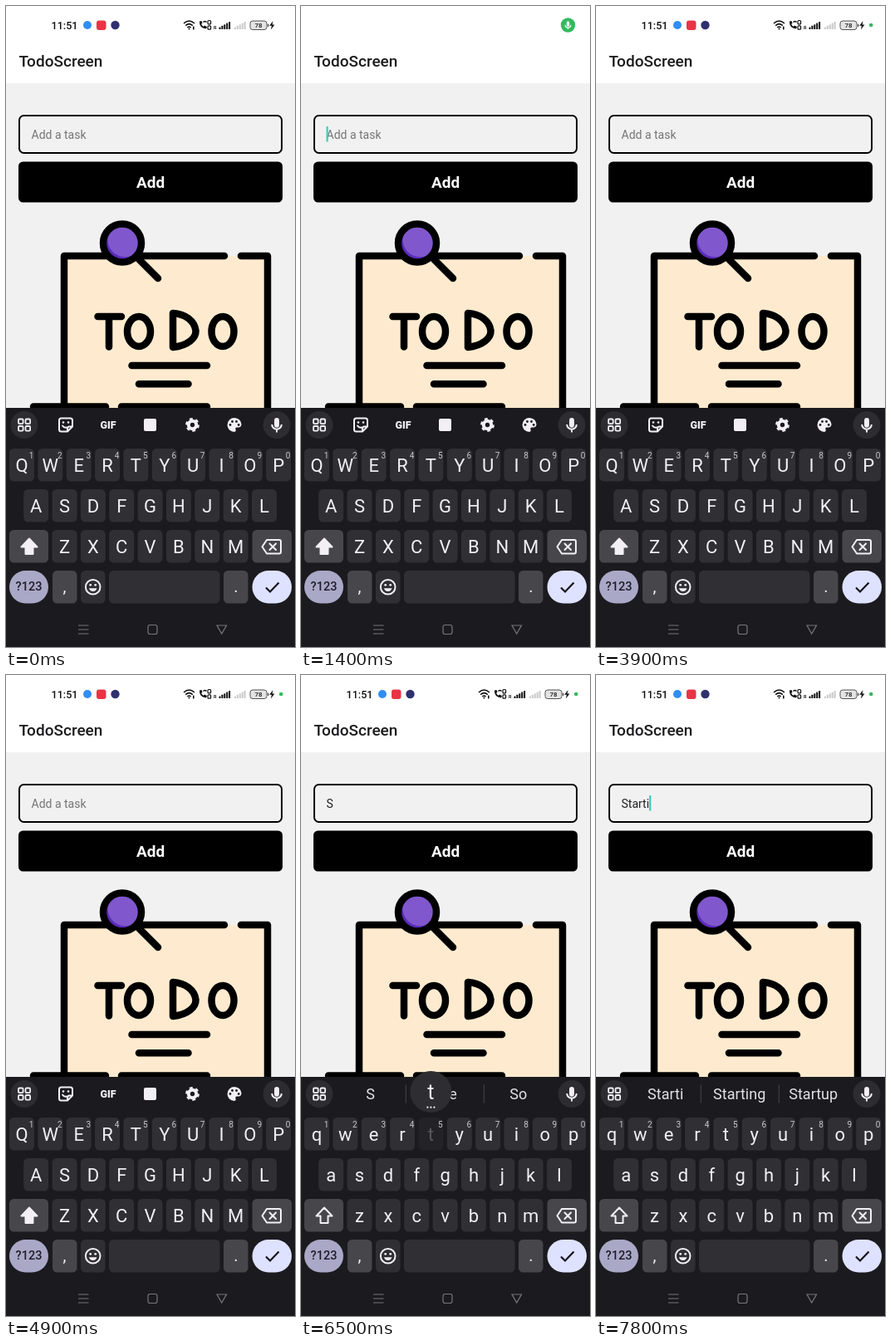
These frames come from a looping animation (348x772 px, 8000 ms). An HTML page:

```html
<!DOCTYPE html>
<html lang="en">
<head>
<meta charset="utf-8">
<title>Todo screen</title>
<style>
  html, body { margin: 0; width: 100%; height: 100%; overflow: hidden; background: #f1f1f1; }
  svg { display: block; width: 348px; height: 772px; }
  text { font-family: Roboto, sans-serif; white-space: pre; }
  .mid { text-anchor: middle; }
  .ink { fill: none; stroke: #000; stroke-width: 8.5; stroke-linecap: round; stroke-linejoin: round; }
  .line { fill: none; stroke: #f2f0f5; stroke-width: 2; stroke-linecap: round; stroke-linejoin: round; }
</style>
</head>
<body>
<svg id="stage" viewBox="0 0 348 772"></svg>
<script>
const LOOP = 8000, STEP = 100;
const DARK = '#1b1b1f', KEY = '#303034', SIDE = '#47474b', LIGHT = '#f2f0f5';

const rect = (x, y, w, h, r, fill, more = '') =>
  `<rect x="${x}" y="${y}" width="${w}" height="${h}" rx="${r}" fill="${fill}" ${more}/>`;
const circle = (x, y, r, fill, more = '') =>
  `<circle cx="${x}" cy="${y}" r="${r}" fill="${fill}" ${more}/>`;
const path = (d, more) => `<path d="${d}" ${more}/>`;
const text = (x, y, size, fill, str, more = '') =>
  `<text x="${x}" y="${y}" font-size="${size}" fill="${fill}" ${more}>${str}</text>`;
const label = (x, y, size, fill, str, more = '') =>
  text(x, y, size, fill, str, 'class="mid" ' + more);
const group = (id, body, more = '') => `<g id="${id}" ${more}>${body}</g>`;
const at = (x, y, body, s = 1) => `<g transform="translate(${x} ${y}) scale(${s})">${body}</g>`;

const mic = color => rect(-2.8, -8.5, 5.6, 11, 2.8, color) +
  path('M-5.5 -1a5.5 5.5 0 0 0 11 0M0 4.5v3.5', `fill="none" stroke="${color}" stroke-width="1.9"`);

function bars(x, color) {
  let s = '';
  for (let i = 0; i < 5; i++) s += rect(x + i * 2.9, 25.5 - i * 1.65, 2, 2.5 + i * 1.65, .5, color);
  return s;
}

function statusBar() {
  const arc = 'fill="none" stroke="#111" stroke-width="1.5"';
  const left = text(54.5, 27.5, 12.6, '#111', '11:51', 'font-weight="500"') +
    circle(98, 23, 5, '#2f8df4') + rect(109, 17.5, 11.5, 11.5, 3, '#e93445') + circle(131.5, 23, 5.2, '#30306f');
  const wifi = path('M214 21q6.5 -6 13 0M216.2 23.6q4.3 -4 8.6 0M218.3 26q2.2 -2 4.4 0', arc) +
    circle(220.5, 27.6, 1, '#111') + rect(225, 24.5, 1.6, 4, .5, '#111');
  const call = path('M233 18.5q-.5 8 8 9l1 -2.5l-3 -1.5l-1.3 1.2q-2 -1 -2.5 -3l1.3 -1.2l-1 -2.5z', 'fill="#111"') +
    path('M237.5 19.5q2 -2 4 0', arc) +
    rect(243, 17.5, 3.6, 4.4, 1, 'none', 'stroke="#111" stroke-width="1.2"') +
    rect(243, 23.8, 3.6, 4.4, 1, 'none', 'stroke="#111" stroke-width="1.2"');
  const battery = rect(294, 18, 20, 10.5, 3, '#e4e4e4', 'stroke="#555" stroke-width="1"') +
    rect(315, 21.4, 1.4, 3.8, .7, '#555') +
    label(304, 26.2, 8, '#222', '78', 'font-weight="500"') +
    path('M321.5 18l-4.3 5.8h2.7l-1 4.7l4.5 -6h-2.8z', 'fill="#111"');
  return left + wifi + call + text(250, 28, 5.5, '#222', 'R', 'font-weight="700"') +
    bars(256.5, '#111') + bars(275, '#c9c9c9') + battery;
}

function note() {
  return rect(70, 301, 245, 190, 0, '#feebcf') +
    path('M70 490V301H263M283 301H315V490', 'class="ink"') +
    path('M33 482.5H120M139 482.5H242', 'class="ink"') +
    path('M160 305L183 328', 'class="ink"') +
    circle(140, 285.5, 23, '#5a2cbb') +
    path('M129 266a16.5 16.5 0 0 0 29 30.500a22 22 0 0 0 -29 -30.500z', 'fill="#8157cd"') +
    circle(140, 285.5, 23, 'none', 'class="ink"') +
    path('M110.500 374H139M124 374V410.500', 'class="ink"') +
    '<ellipse cx="160" cy="392" rx="14" ry="18" class="ink"/>' +
    path('M201 370V411C219 409 229 400 228.500 391C227 379 216 371 201 370Z', 'class="ink"') +
    '<ellipse cx="261" cy="392" rx="13.500" ry="18" class="ink"/>' +
    path('M151.500 433H242M160 455.300H219.500', 'class="ink"');
}

function tools() {
  const dots = [[0, -5], [-4, 3], [4, 3]];
  const sticker = path('M-8 -5.5q0 -2.500 2.500 -2.500h11q2.500 0 2.500 2.500v7.500l-6 6h-7.500q-2.500 0 -2.500 -2.500zM2 8v-3.500q0 -2.500 2.500 -2.500h3.500', 'class="line"') +
    circle(-3, -3, 1.3, LIGHT) + circle(3, -3, 1.3, LIGHT) + path('M-4 1q2 3 5 2', 'class="line"');
  const gear = circle(0, 0, 4.7, 'none', `stroke="${LIGHT}" stroke-width="4"`) +
    circle(0, 0, 7.2, 'none', `stroke="${LIGHT}" stroke-width="2.4" stroke-dasharray="3.8 3.74"`);
  const palette = path('M0 -8.500a8.500 8.500 0 1 0 0 17q2.500 -.5 1.500 -3q-1 -2.500 2 -2.500h2q3 -.5 3 -4q-.8 -7 -8.500 -7.500z', `fill="${LIGHT}"`) +
    [[-5, 0], [-2.5, -4], [2.5, -4], [5.2, 0]].map(p => circle(...p, 1.4, DARK)).join('');
  return at(72, 504.5, sticker) +
    label(123, 509, 12.5, LIGHT, 'GIF', 'font-weight="900"') +
    rect(166, 497, 15, 15, 2, LIGHT) + at(224.5, 504.5, gear) + at(275, 504.5, palette);
}

const rows = [['qwertyuiop', 19, 533], ['asdfghjkl', 36.2, 582], ['zxcvbnm', 70.5, 631]];
const keys = {};
rows.forEach(([letters, x, y]) => [...letters].forEach((c, i) => keys[c] = { x: x + i * 34.35, y }));

function keyboard() {
  let s = rect(0, 484, 348, 288, 0, DARK) + circle(22, 504.5, 16.5, '#2d2d31') + circle(326, 504.5, 16.5, '#2d2d31');
  for (const x of [15, 23.5]) for (const y of [497.5, 506])
    s += rect(x, y, 5.6, 5.6, 1.2, 'none', `stroke="${LIGHT}" stroke-width="1.8"`);
  s += at(326, 505, mic(LIGHT), 1.05) + group('tools', tools()) + group('hints', '');
  for (const [c, k] of Object.entries(keys)) {
    s += rect(k.x - 15, k.y, 30, 39.5, 5.5, KEY, `id="box-${c}"`) +
      label(k.x, k.y + 27.5, 22, LIGHT, c, `id="key-${c}"`);
  }
  [...'1234567890'].forEach((n, i) => s += label(30.5 + i * 34.35, 544.8, 10, '#c9c8ce', n));
  s += rect(4, 631, 47, 39.5, 5.5, SIDE) + rect(296.5, 631, 47.5, 39.5, 5.5, SIDE) +
    path('M28 641.500L37.500 651.500H32.500V660H23.500V651.500H18.500Z', 'class="line" id="shift"') +
    path('M314 643H329Q331 643 331 645V657.500Q331 659.500 329 659.500H314L308.500 651.200ZM317.500 647.500L325 655M325 647.500L317.500 655', 'class="line"');
  s += rect(4, 680, 47, 39.5, 19.7, '#a9a8c6') + label(27.5, 704.3, 14.5, '#1d1d2b', '?123', 'font-weight="500"') +
    rect(56, 680, 29.5, 39.5, 5.5, SIDE) + label(70.5, 706, 20, LIGHT, ',') +
    rect(90, 680, 29.5, 39.5, 5.5, KEY) + rect(124, 680, 133.5, 39.5, 5.5, KEY) +
    rect(262, 680, 29.5, 39.5, 5.5, SIDE) + label(277, 706, 20, LIGHT, '.') +
    rect(296.5, 680, 47.5, 39.5, 19.7, '#dfe2ff') +
    path('M313 700.500L318 705.500L328.500 694.500', 'fill="none" stroke="#15151c" stroke-width="2.2"');
  s += at(104.7, 699.8, circle(0, 0, 8.8, 'none', 'class="line"') + circle(-3, -2.5, 1.4, LIGHT) +
    circle(3, -2.5, 1.4, LIGHT) + path('M-4.800 1.500a5 5 0 0 0 9.600 0z', `fill="${LIGHT}"`));
  s += '<g fill="none" stroke="#77767b" stroke-width="1.200">' +
    '<path d="M87 746H99.500M87 751H99.500M87 756H99.500M254 746H265.500L259.700 756Z"/>' +
    '<rect x="171" y="745.500" width="11" height="11" rx="2.500"/></g>';
  return s;
}

const stage = document.getElementById('stage');
stage.innerHTML = rect(0, 0, 348, 772, 0, '#f1f1f1') + rect(0, 0, 348, 93, 0, '#fff') +
  group('status', statusBar()) + group('chip', circle(0, 0, 8.7, '#34ba5c') + group('chipMic', at(0, .3, mic('#fff'), .6))) +
  text(15.5, 73, 19, '#1c1c1e', 'TodoScreen', 'font-weight="500"') +
  rect(16, 132, 316, 45, 5.5, '#f1f1f1', 'stroke="#000" stroke-width="2"') +
  text(30.5, 160, 14, '#757575', '', 'id="field"') + rect(30.5, 145, 2.2, 18.5, 0, '#35d0bf', 'id="caret"') +
  rect(15, 187.5, 318, 49, 5.5, '#000') + label(174, 219.3, 19, '#fff', 'Add', 'font-weight="700"') +
  note() + keyboard() +
  group('popup', circle(0, 0, 25, '#2e2e32') + label(0, 8.6, 25, LIGHT, '', 'id="popKey"') +
    [-4, 0, 4].map(x => circle(x, 18.7, 1.1, LIGHT)).join(''));

const $ = id => document.getElementById(id);
const set = (id, name, value) => $(id).setAttribute(name, value);
const show = (id, on) => set(id, 'visibility', on ? 'visible' : 'hidden');
const ramp = (t, a, b) => { const k = Math.min(1, Math.max(0, (t - a) / (b - a))); return k * k * (3 - 2 * k); };

const star = 'M0 -10L3 -3.500L10 -2.700L4.800 2L6.300 9L0 5.500L-6.300 9L-4.800 2L-10 -2.700L-3 -3.500Z';
const spark = 'M0 -7Q1 -1 6 0Q1 1 0 7Q-1 1 -6 0Q-1 -1 0 -7Z';
function hints(words) {
  if (!words) return '';
  const rule = x => rect(x, 493.5, 1, 22, 0, '#45454a');
  let s = rule(125.8) + rule(219.8);
  words.forEach((w, i) => s += label(83.7 + i * 89, 511, 18, '#e3e1e8', w));
  if (words.length < 3) s += rule(262.8) +
    at(242, 504.8, path(star, 'fill="#fcc21b" stroke="#fcc21b" stroke-linejoin="round"')) +
    at(286.5, 504.8, path(spark, 'fill="#fdbf2d"'), 1.2) +
    at(279, 498.5, path(spark, 'fill="#fdbf2d"'), .55) + at(279.5, 511, path(spark, 'fill="#fdbf2d"'), .55);
  return s;
}

// time, typed text, suggestions, pressed key
const first = ['S', 'She', 'So'], second = ['St', 'Still', 'So'], third = ['Sta', 'Stay', 'Start'];
const fourth = ['Star', 'Start'], fifth = ['Start', 'Starting', 'Started'];
const script = [
  [0, '', null], [5800, '', null, 's'], [6000, 'S', null], [6100, 'S', first],
  [6500, 'S', first, 't'], [6600, 'St', second], [6700, 'St', second, 'a'],
  [6800, 'Sta', third], [6900, 'Sta', third, 'r'], [7000, 'Star', fourth],
  [7100, 'Star', fourth, 't'], [7200, 'Start', fourth], [7300, 'Start', fifth],
  [7700, 'Start', fifth, 'i'], [7800, 'Starti', ['Starti', 'Starting', 'Startup']]
];
const blinks = [400, 900, 1400, 1900, 2400, 2900, 3400, 3900, 4400, 4900, 5500, 5900, 6000, 6500, 6600, 7700, 7800];

let current;
function type(entry) {
  if (entry === current) return;
  current = entry;
  const [, typed, words, pressed] = entry, field = $('field');
  field.textContent = typed || 'Add a task';
  set('field', 'fill', typed ? '#222' : '#757575');
  set('caret', 'x', 30.5 + (typed ? field.getComputedTextLength() : 0));
  for (const c in keys) {
    $('key-' + c).textContent = typed ? c : c.toUpperCase();
    set('key-' + c, 'fill', c === pressed ? '#58585c' : LIGHT);
    set('box-' + c, 'fill', c === pressed ? '#232327' : KEY);
  }
  set('shift', 'style', typed ? 'fill:none' : 'fill:' + LIGHT);
  show('tools', !words);
  $('hints').innerHTML = hints(words);
  show('popup', !!pressed);
  if (pressed) {
    const k = keys[pressed];
    set('popup', 'transform', `translate(${k.x} ${k.y - 31})`);
    $('popKey').textContent = typed ? pressed : pressed.toUpperCase();
  }
}

function draw(t) {
  type(script.filter(e => e[0] <= t).pop());
  show('caret', blinks.filter(b => b <= t).length % 2);
  set('status', 'opacity', 1 - ramp(t, 200, 600) + ramp(t, 1900, 2400));
  const grow = ramp(t, 400, 1000), shrink = ramp(t, 1500, 2100);
  set('chip', 'opacity', grow);
  set('chip', 'transform', `translate(${321.5 + 9.7 * shrink} 23) scale(${(.5 + .5 * grow) * (1 - .73 * shrink)})`);
  set('chipMic', 'opacity', 1 - ramp(t, 1500, 1800));
}

const start = performance.now();
function tick(now) {
  const t = Math.max(0, now - start) % LOOP;
  draw(Math.floor(t / STEP) * STEP);
  requestAnimationFrame(tick);
}
draw(0);
requestAnimationFrame(tick);
</script>
</body>
</html>
```
